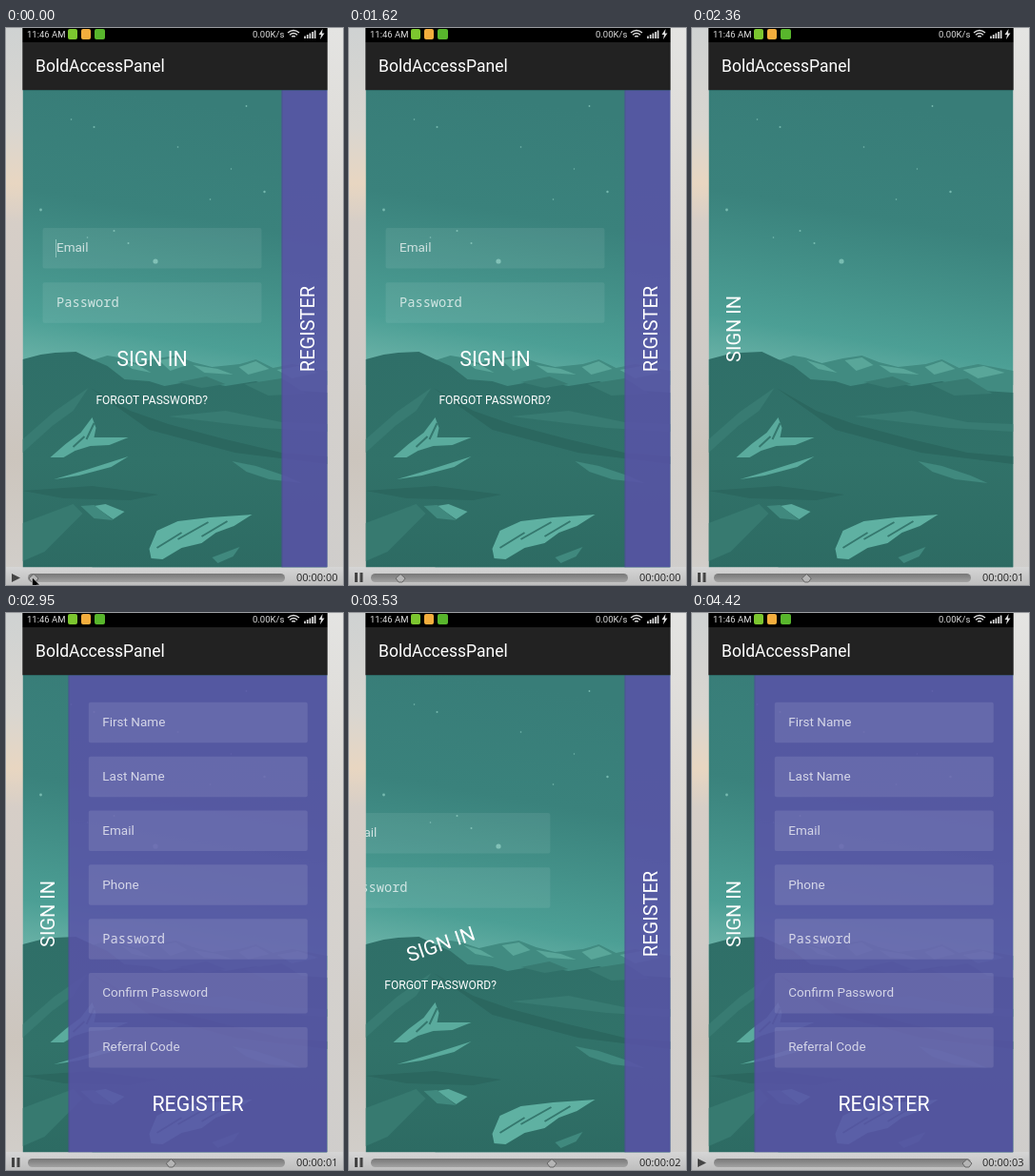
Animation of 354x585 px, one loop 4520 ms. Source, as an HTML page:

```html
<!DOCTYPE html>
<html lang="en">
<head>
<meta charset="utf-8">
<title>Sliding sign-in screen</title>
<style>
  html, body { margin: 0; width: 100%; height: 100%; overflow: hidden; background: #cfccc8; }
  svg { display: block; }
  text { font-family: Roboto, sans-serif; fill: #fff; white-space: pre; }
  .hint { font-size: 13.5px; fill: #fff; opacity: .72; }
  .mono { font-family: "Noto Sans Mono", monospace; font-size: 13.7px; }
  .box { fill: #fff; opacity: .1; }
  #signIn .box { opacity: .075; }
  .big { font-size: 21.3px; text-anchor: middle; }
  .side { font-size: 20px; text-anchor: middle; }
  .status { font-size: 9.5px; fill: #ddd; }
  #clock { font: 11px "Open Sans", sans-serif; fill: #222; }
</style>
</head>
<body>
<svg width="354" height="585" viewBox="0 0 354 585">
  <defs>
    <linearGradient id="deskLeft" x2="0" y2="1">
      <stop stop-color="#cfd2d2"/><stop offset=".18" stop-color="#d9d6d0"/>
      <stop offset=".28" stop-color="#e8d6c1"/><stop offset=".35" stop-color="#d6cec7"/>
      <stop offset=".6" stop-color="#cfcbc7"/><stop offset=".77" stop-color="#ccc5bd"/>
      <stop offset="1" stop-color="#d2cfcb"/>
    </linearGradient>
    <linearGradient id="deskRight" x2="0" y2="1">
      <stop stop-color="#e4e4e2"/><stop offset=".4" stop-color="#d8d4cf"/><stop offset="1" stop-color="#cfcdcb"/>
    </linearGradient>
    <linearGradient id="sky" gradientUnits="userSpaceOnUse" x1="85" y1="60" x2="35" y2="352">
      <stop stop-color="#387d78"/><stop offset=".4" stop-color="#3a827c"/>
      <stop offset=".62" stop-color="#439088"/><stop offset=".84" stop-color="#4c9f95"/>
      <stop offset="1" stop-color="#69b1a6"/>
    </linearGradient>
    <linearGradient id="land" x2="0" y2="1">
      <stop stop-color="#2f6f68"/><stop offset=".5" stop-color="#317269"/><stop offset="1" stop-color="#2d6b63"/>
    </linearGradient>
    <linearGradient id="bar" x2="0" y2="1"><stop stop-color="#d6d6d6"/><stop offset="1" stop-color="#bebebe"/></linearGradient>
    <linearGradient id="track" x2="0" y2="1"><stop stop-color="#777"/><stop offset="1" stop-color="#a2a2a2"/></linearGradient>
  </defs>

  <rect width="20" height="585" fill="url(#deskLeft)"/>
  <rect x="334" width="20" height="585" fill="url(#deskRight)"/>
  <rect y="566" width="354" height="19" fill="url(#bar)"/>

  <svg x="17.5" y="65" width="320" height="501.3" viewBox="17 65 320 501.3">
    <rect x="17" y="65" width="320" height="310" fill="url(#sky)"/>
    <g id="stars" fill="#8fd0c4"></g>
    <path fill="#418b81" d="M90 349L106 344 118 346 136 352 158 347 178 344 196 351 216 356 245 353 262 348 280 357 300 353 337 360V567H90Z"/>
    <path fill="#59a699" d="M120 349L138 354 152 362 132 358Z M160 349L178 346 190 354 172 360Z M196 354L222 358 238 364 208 362Z M244 356L262 350 276 358 254 364Z M284 359L306 355 328 362 300 368Z"/>
    <path fill="url(#land)" d="M17 348L36 343 51 341 73 340 90 348 106 355 124 369 150 371 166 376 200 370 230 376 262 371 290 380 337 383V567H17Z"/>
    <path fill="#387b72" d="M17 432L50 403 86 378 70 402 48 418 17 446Z M180 372L210 366 230 374 205 378Z M250 374L289 368 315 384 275 386Z M170 408L230 402 289 414 337 416V424L270 420Z"/>
    <path fill="#2b675f" d="M88 378L130 402 170 416 230 432 289 446 337 450V458L240 446 150 422Z M17 486L90 481 160 490 130 496 60 494Z"/>
    <path fill="#377a70" d="M17 520L70 500 80 510 40 550 17 560Z"/>
    <path fill="#5aab9d" d="M46 451L62 437 78 425 90 409 94 420 92 430 128 430 108 438 88 439 72 444 60 451Z M50 474L84 464 128 450 110 461 76 470Z"/>
    <path fill="#5fb1a2" d="M150 547L158 528 180 518 214 514 258 511 239 523 220 530 205 541 184 546 164 558 152 557Z"/>
    <path stroke="#35786e" stroke-width="2" d="M158 546L184 530M180 537L212 519M205 534L232 518M84 432L92 415M70 440L82 429"/>
    <path fill="#5aab9d" d="M92 502L104 500 124 508 112 516Z"/>
    <path fill="#40897e" d="M78 502L92 501 112 517 92 515Z M237 455L262 460 292 470 310 478 276 474 252 466Z M216 556L245 545 238 555 222 562Z"/>

    <g id="signIn"></g>
    <text id="signInSide" class="side" transform="translate(50.5 316)rotate(-90)">SIGN IN</text>
    <g id="panel">
      <rect width="272" y="65" height="502" fill="#5a52a8" opacity=".85"/>
      <path d="M.5 65V567" stroke="#30506f" opacity=".3"/>
      <g id="register"></g>
    </g>
    <text id="registerSide" class="side" transform="translate(323 316)rotate(-90)">REGISTER</text>
  </svg>

  <rect x="17.3" width="320.4" height="15" fill="#000"/>
  <rect x="17.3" y="15" width="320.4" height="50" fill="#222"/>
  <rect x="17.5" y="65" width="320" height="1" fill="#1d4a48" opacity=".4"/>
  <text x="31" y="46" font-size="17.5">BoldAccessPanel</text>
  <text class="status" x="22" y="10">11:46 AM</text>
  <rect x="65" y="1" width="10" height="11" rx="2" fill="#7cc62f"/>
  <rect x="79" y="1" width="10" height="11" rx="2" fill="#f3ae3d"/>
  <rect x="93" y="1" width="11" height="11" rx="2" fill="#58b62c"/>
  <text class="status" x="259" y="10">0.00K/s</text>
  <g fill="none" stroke="#ddd" stroke-width="1.5">
    <path d="M296 5Q302 0 308 5M298 7.2Q302 3.8 306 7.2M300.2 9.2Q302 7.8 303.8 9.2"/>
    <path d="M314 11V8.5M316.7 11V7M319.4 11V5.5M322.1 11V4M324.6 11V2.5" stroke-width="1.7"/>
  </g>
  <path d="M332.5 1L328.5 7H331L330 12 334.5 5.5H332Z" fill="#ddd"/>

  <rect x="23" y="573" width="270" height="9" rx="4.5" fill="url(#track)"/>
  <path id="knob" d="M0 -4.5L5 0 2 4H-2L-5 0Z" fill="#b5b5b5" stroke="#666"/>
  <path id="play" d="M6 573L15 577.5 6 582Z" fill="#444"/>
  <path id="pause" d="M6 572h3v10h-3ZM11.5 572h3v10h-3Z" fill="#444"/>
  <text id="clock" x="305" y="581"></text>
  <path id="mouse" d="M0 0V11L2.5 8.7 4.2 12.5 6 11.7 4.4 8H8Z" fill="#000" stroke="#eee" stroke-width=".5"/>
</svg>

<script>
const $ = id => document.getElementById(id);
const LOOP = 4520, STEP = 147.5, SLIDE = 424;
const REGISTER_1 = 2360, SIGN_IN = 3097, REGISTER_2 = 3818;
const VIDEO_START = 1343, KNOB_MIN = 29, KNOB_MAX = 289;

const field = (x, y, hint) =>
  `<rect class="box" x="${x}" y="${y}" width="230" height="42.5" rx="2"/>
   <text class="hint ${hint === 'Password' ? 'mono' : ''}" x="${x + 14.5}" y="${y + 25.3}">${hint}</text>`;

$('signIn').innerHTML = field(38, 210, 'Email') + field(38, 267.3, 'Password') +
  `<path id="caret" d="M52 222V241" stroke="#8fc4bd"/>
   <text id="signInButton" class="big" x="153" y="355">SIGN IN</text>
   <text x="152.7" y="395" font-size="12.05" text-anchor="middle">FORGOT PASSWORD?</text>`;

$('register').innerHTML =
  ['First Name', 'Last Name', 'Email', 'Phone', 'Password', 'Confirm Password', 'Referral Code']
    .map((hint, i) => field(21.3, 93.8 + i * 56.85, hint)).join('') +
  '<text id="registerButton" class="big" x="136" y="523">REGISTER</text>';

const stars = [[36, 191, 1.4], [156.5, 245, 2.6], [92, 104, 1], [113, 213, 1], [128, 226, 1], [271, 172, 1.2],
  [252, 82, .9], [180, 125, .8], [68, 96, .8], [214, 180, .8], [85, 220, .8], [236, 148, .7]];
$('stars').innerHTML = stars.map(([x, y, r]) => `<circle cx="${x}" cy="${y}" r="${r}" opacity=".7"/>`).join('');

const clamp = (v, lo, hi) => Math.min(hi, Math.max(lo, v));
const ease = p => (1 - Math.cos(Math.PI * clamp(p, 0, 1))) / 2;
const show = (id, on) => $(id).setAttribute('display', on ? 'inline' : 'none');
const transform = (id, value) => $(id).setAttribute('transform', value);

function drawScreen(t) {
  const registering = t >= REGISTER_2 || (t >= REGISTER_1 && t < SIGN_IN);
  const start = t >= REGISTER_2 ? REGISTER_2 : t >= SIGN_IN ? SIGN_IN : t >= REGISTER_1 ? REGISTER_1 : -SLIDE;
  const p = ease((t - start) / SLIDE);
  const turn = -90 * (1 - p);

  for (const id of ['signInSide', 'register']) show(id, registering);
  for (const id of ['signIn', 'registerSide']) show(id, !registering);
  transform('panel', `translate(${registering ? 337 - 272 * p : 289} 0)`);
  transform('signIn', `translate(${-272 * (1 - p)} 0)`);
  transform('signInButton', `rotate(${turn} 153 348)`);
  transform('registerButton', `rotate(${turn} 136 516)`);
  show('caret', t < 1000);
}

function drawPlayer(t, step) {
  const knob = clamp(KNOB_MIN + (t - VIDEO_START) * .0898, KNOB_MIN, KNOB_MAX);
  const playing = knob > KNOB_MIN && knob < KNOB_MAX;
  transform('knob', `translate(${knob} 578)`);
  show('play', !playing);
  show('pause', playing);
  $('clock').textContent = '00:00:0' + Math.floor((knob - KNOB_MIN) / 76.5);
  show('mouse', knob === KNOB_MIN);
  transform('mouse', `translate(${27.5 - 21.5 * ease(step / 5)} 577)`);
}

function frame(now) {
  const step = Math.floor((now % LOOP + 8) / STEP);
  drawScreen(step * STEP);
  drawPlayer(step * STEP, step);
  requestAnimationFrame(frame);
}
frame(0);
</script>
</body>
</html>
```
